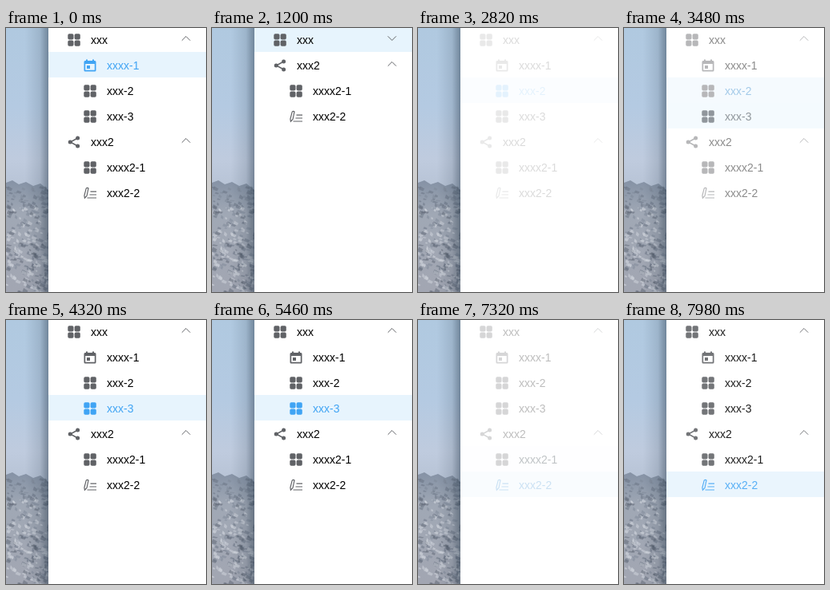
Recreate the animation shown at these times as an HTML page. Size 250x331 px, loop 8 s.

```html
<!DOCTYPE html>
<html lang="en">
<head>
<meta charset="utf-8">
<title>Side menu</title>
<style>
  html, body { margin: 0; width: 100%; height: 100%; overflow: hidden; background: #fff; }
  #stage { position: relative; width: 250px; height: 331px; overflow: hidden; }
  #photo { position: absolute; left: 0; top: 0; }
  #menu { position: absolute; left: 53px; top: -2px; width: 197px; height: 333px; background: #fff;
          font: 14px/34px "Liberation Sans", Arial, sans-serif; }
  .row { position: relative; height: 32px; color: #000; white-space: pre; }
  .row span { position: absolute; left: 53px; top: 0; }
  .sub .row span { left: 73px; }
  .icon { position: absolute; left: 24px; top: 9px; width: 16px; height: 16px; color: #606266; }
  .sub .icon { left: 44px; }
  .arrow { position: absolute; left: 166px; top: 9px; width: 12px; height: 12px; }
  .sub { overflow: hidden; }
  #mask { position: absolute; inset: 0; background: #fff; }
</style>
</head>
<body>
<div id="stage">
  <svg id="photo" width="53" height="331">
    <defs>
      <linearGradient id="sky" x2="0" y2="1">
        <stop offset="0" stop-color="#b0c9e0"/>
        <stop offset=".3" stop-color="#b4cae2"/>
        <stop offset=".5" stop-color="#bfcbde"/>
        <stop offset=".62" stop-color="#b6c2d4"/>
      </linearGradient>
      <linearGradient id="rock" x2="0" y2="1">
        <stop offset="0" stop-color="#8592a5"/>
        <stop offset=".3" stop-color="#a0a8b5"/>
        <stop offset="1" stop-color="#a2a6b2"/>
      </linearGradient>
      <linearGradient id="shade">
        <stop offset=".45" stop-color="#26384a" stop-opacity="0"/>
        <stop offset=".8" stop-color="#26384a" stop-opacity=".14"/>
        <stop offset="1" stop-color="#26384a" stop-opacity=".46"/>
      </linearGradient>
    </defs>
    <rect width="53" height="331" fill="url(#sky)"/>
    <path fill="url(#rock)" d="M0 194 8 191 16 196 25 193 34 198 43 195 53 203V331H0Z"/>
    <g id="crags"></g>
    <rect width="53" height="331" fill="url(#shade)"/>
  </svg>
  <div id="menu"></div>
</div>
<script>
const LOOP = 8000, STEP = 60, FADE = 300, LOAD = 660;
const clicks = [2390, 3440, 6050, 7150];
const loads = [2390, 3370, 6050, 7150];
const collapseAt = 890, expandAt = 1590;

const icons = {
  grid: [[0.3, 0.3], [8.6, 0.3], [0.3, 8.6], [8.6, 8.6]].map(([x, y]) =>
    `<rect x="${x}" y="${y}" width="7.2" height="7.2" rx="1.8" fill="currentColor"/>`).join(''),
  calendar: `<path fill="currentColor" fill-rule="evenodd"
    d="M3 .5H5V2H11V.5H13V2H14Q15.5 2 15.5 3.5V14Q15.5 15.5 14 15.5H2Q.5 15.5 .5 14V3.5Q.5 2 2 2H3ZM2.2 6V13.8H13.8V6ZM4 8H8V12H4Z"/>`,
  share: `<path stroke="currentColor" stroke-width="1.5" d="M12.6 3 3.4 8 12.6 13"/>
    <g fill="currentColor"><circle cx="3.2" cy="8" r="2.5"/><circle cx="12.6" cy="2.9" r="2.5"/><circle cx="12.6" cy="13.1" r="2.5"/></g>`,
  edit: `<path stroke="currentColor" stroke-width="1.2" d="M3.2 2.2Q4.6 .7 6 2L4 11.5 1.4 14.2 .9 11ZM8.5 6.2H16M7.5 10H16M4.5 14H16"/>`
};

// lit: spans with a tinted row; active: span as the selected entry
const rows = [
  { text: 'xxx', icon: 'grid', group: 0, lit: [[390, 1800]] },
  { text: 'xxxx-1', icon: 'calendar', sub: 0, lit: [[-LOOP, clicks[0]]], active: [-LOOP, clicks[0]] },
  { text: 'xxx-2', icon: 'grid', sub: 0, lit: [[1950, clicks[1]]], active: [clicks[0], clicks[1]] },
  { text: 'xxx-3', icon: 'grid', sub: 0, lit: [[3180, clicks[2]]], active: [clicks[1], clicks[2]] },
  { text: 'xxx2', icon: 'share', group: 1, lit: [[4600, 4720]] },
  { text: 'xxxx2-1', icon: 'grid', sub: 1, lit: [[4720, 4900], [5780, clicks[3]]], active: [clicks[2], clicks[3]] },
  { text: 'xxx2-2', icon: 'edit', sub: 1, lit: [[4900, 5100], [5600, 5780], [6950, 2 * LOOP]], active: [clicks[3], 2 * LOOP] }
];

const menu = document.getElementById('menu');
const subs = [];
const add = (parent, className, html = '') => {
  const el = document.createElement('div');
  el.className = className;
  el.innerHTML = html;
  return parent.appendChild(el);
};

for (const row of rows) {
  const isGroup = row.group !== undefined;
  const arrow = isGroup ? `<svg class="arrow" fill="none" stroke="#606266"><path d="M.8 8.7 6 3.5 11.2 8.7"/></svg>` : '';
  row.el = add(isGroup ? menu : subs[row.sub], 'row',
    `<svg class="icon" fill="none" overflow="visible">${icons[row.icon]}</svg><span>${row.text}</span>${arrow}`);
  row.iconEl = row.el.querySelector('.icon');
  if (isGroup) subs.push(add(menu, 'sub'));
}
const mask = add(menu, '');
mask.id = 'mask';
const firstArrow = menu.querySelector('.arrow');

function drawCrags() {
  let seed = 7;
  const random = () => (seed = seed * 16807 % 2147483647) / 2147483647;
  const tones = ['#66707f', '#7d8797', '#d3d7df', '#e0e3e9', '#5c6472'];
  let html = '';
  for (let i = 0; i < 260; i++) {
    const x = random() * 53, y = 198 + random() * 133, w = 2 + random() * 4, h = 2 + random() * 5;
    const tone = tones[Math.floor(random() * (y < 222 ? 2 : 5))];
    html += `<path fill="${tone}" opacity=".5" d="M${x} ${y}l${w} ${h / 2} ${-w / 3} ${h / 2} ${-w} ${-h / 3}z"/>`;
  }
  document.getElementById('crags').innerHTML = html;
}

const clamp = x => Math.min(1, Math.max(0, x));

// cubic-bezier(x1, y1, x2, y2), solved by bisection
function bezier(x1, y1, x2, y2) {
  const at = (a, b, s) => 3 * a * s * (1 - s) ** 2 + 3 * b * s * s * (1 - s) + s ** 3;
  return x => {
    if (x <= 0 || x >= 1) return clamp(x);
    let lo = 0, hi = 1;
    for (let i = 0; i < 20; i++) {
      const mid = (lo + hi) / 2;
      if (at(x1, x2, mid) < x) lo = mid; else hi = mid;
    }
    return at(y1, y2, lo);
  };
}
const ease = bezier(.25, .1, .25, 1);
const easeInOut = bezier(.42, 0, .58, 1);

const level = (t, [on, off], curve = ease) =>
  clamp(curve((t - on) / FADE) - curve((t - off) / FADE));

function render(t) {
  for (const { el, iconEl, lit, active } of rows) {
    const tint = Math.max(...lit.map(span => level(t, span)));
    el.style.background = `rgba(231, 244, 253, ${tint})`;
    if (!active) continue;
    const blue = level(t, active);
    const color = `rgb(${[64, 164, 244].map(c => Math.round(c * blue))})`;
    el.style.color = color;
    iconEl.style.color = t >= active[0] && t < active[1] ? color : '#606266';
  }
  const closed = level(t, [collapseAt, expandAt], easeInOut);
  subs[0].style.height = 96 * (1 - closed) + 'px';
  firstArrow.style.transform = `rotate(${180 * level(t, [collapseAt, expandAt])}deg)`;
  mask.style.opacity = .86 * Math.max(...loads.map(at => level(t, [at, at + LOAD])));
}

function tick() {
  const t = performance.now() % LOOP;
  render(Math.floor(t / STEP) * STEP);
  requestAnimationFrame(tick);
}
drawCrags();
tick();
</script>
</body>
</html>
```
